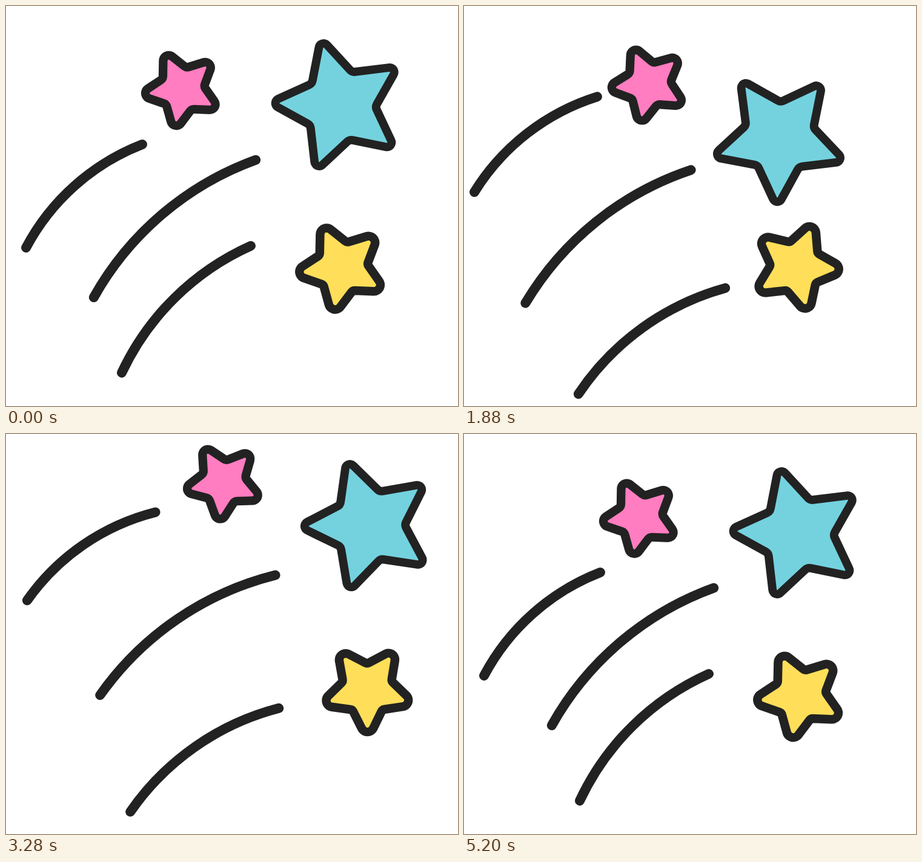
These frames come from a looping animation (746x662 px, 5880 ms). An HTML page:

```html
<!DOCTYPE html>
<html lang="en">
<head>
<meta charset="utf-8">
<title>Shooting stars</title>
<style>
  html, body { margin: 0; width: 100%; height: 100%; overflow: hidden; background: #fff; }
  svg { display: block; width: 746px; height: 662px; }
</style>
</head>
<body>
<svg id="stage" viewBox="0 0 746 662" xmlns="http://www.w3.org/2000/svg"></svg>
<script>
const LOOP = 5880, TICK = 40, STEP = 64, LAST = 81;
const INK = '#222222';
const KEYS = [0, 14, 29, 44, 59, 71];
const stage = document.getElementById('stage');

// Poses are [x, y, degrees] at KEYS. The first one is also the resting pose.
// lag: how strongly a part still moves when it passes a key; end: step at which it rests.
const parts = [
  { len: 257, lag: 0.069, end: 80, poses: [
    [129, 314.5, -41.7], [165, 209, -34.6], [118.5, 229, -37.9],
    [148, 196.5, -33.8], [113.5, 228, -37.9], [115, 281, -40.9]] },
  { len: 351, lag: 0.05, end: 79, poses: [
    [278.5, 368.5, -40.4], [345, 299.5, -33], [238, 381.5, -38.9],
    [322.5, 315.5, -32.9], [237, 381.5, -38.9], [267.5, 373, -40]] },
  { len: 299, lag: 0.35, end: 81, poses: [
    [297.5, 502, -44.6], [329, 516.5, -39.7], [310, 554.5, -35.9],
    [319.5, 546.5, -35.4], [309.5, 555, -35.9], [282, 545.5, -39.7]] },
  { fill: '#ff7dc0', tip: 52, notch: 26, edge: 16.3, soft: 2, lag: 0.1, end: 78, poses: [
    [290.8, 137.8, -43.3], [368.4, 77.8, -32.3], [304.8, 129.5, -41.7],
    [364.1, 77, -38.7], [303.4, 124.6, -75], [287.6, 139.9, -46]] },
  { fill: '#74d2df', tip: 98.8, notch: 50, edge: 14.6, soft: 0.8, lag: 0.033, end: 75.5, poses: [
    [551, 164.6, -33.8], [640.8, 130.5, -26], [520.5, 217.5, -52],
    [635.3, 123.2, -32.9], [524.5, 210.5, -45.7], [545.6, 172, -34.6]] },
  { fill: '#ffde59', tip: 60, notch: 30, edge: 18, soft: 3.5, lag: 0.1, end: 80, poses: [
    [554.6, 432.6, -43.1], [613.8, 421.9, -38.7], [548, 431.6, -68.4],
    [600.8, 422.8, -51.2], [546, 427, -75.3], [534.4, 433.1, -47.9]] }
];

function add(parent, tag, attrs) {
  const el = document.createElementNS('http://www.w3.org/2000/svg', tag);
  for (const name in attrs) el.setAttribute(name, attrs[name]);
  return parent.appendChild(el);
}

function polar(r, deg) {
  const a = deg * Math.PI / 180;
  return [r * Math.cos(a), r * Math.sin(a)];
}

// Five sharp tips with rounded notches between them.
function starPath(tip, notch) {
  let d = '';
  for (let i = 0; i < 5; i++) {
    const a = polar(tip, i * 72), n = polar(notch, i * 72 + 36), b = polar(tip, i * 72 + 72);
    const cut = 9 / Math.hypot(a[0] - n[0], a[1] - n[1]);
    const toward = p => n.map((v, j) => v + (p[j] - v) * cut);
    d += `${i ? 'L' : 'M'}${a} L${toward(a)} Q${n} ${toward(b)} `;
  }
  return d + 'Z';
}

function build(part) {
  const g = part.node = add(stage, 'g', { 'stroke-linejoin': 'round', 'stroke-linecap': 'round' });
  if (part.len) {
    const h = part.len / 2, r = part.len * 1.434;
    add(g, 'path', { d: `M${-h} 0 A${r} ${r} 0 0 1 ${h} 0`, fill: 'none', stroke: INK, 'stroke-width': 16 });
  } else {
    const d = starPath(part.tip, part.notch);
    add(g, 'path', { d, fill: INK, stroke: INK, 'stroke-width': 2 * part.edge });
    add(g, 'path', { d, fill: part.fill, stroke: part.fill, 'stroke-width': 2 * part.soft });
  }
  prepare(part);
}

// Speeds: the part swings forward at keys 1 and 3, back at 2 and 4, then settles at rest.
function prepare(part) {
  const p = part.poses, home = p[0];
  const swing = home.map((_, j) => part.lag * (p[3][j] - (p[2][j] + p[4][j]) / 2));
  const back = swing.map(v => -v), still = [0, 0, 0];
  const settle = home.map((v, j) => 2 * (v - p[5][j]) / (part.end - KEYS[5]));
  part.times = [...KEYS, part.end];
  part.path = [...p, home];
  part.speed = [still, swing, back, swing, back, settle, still];
}

function poseAt(part, k) {
  const { times, path, speed } = part;
  if (k >= part.end) return path[0];
  let i = 0;
  while (k >= times[i + 1]) i++;
  const h = times[i + 1] - times[i], u = (k - times[i]) / h, w = 1 - u;
  return path[i].map((v, j) =>
    v * (1 + 2 * u) * w * w + path[i + 1][j] * u * u * (3 - 2 * u) +
    h * u * w * (speed[i][j] * w - speed[i + 1][j] * u));
}

function draw(ms) {
  const t = Math.floor((ms % LOOP) / TICK) * TICK;
  const k = Math.min(LAST, Math.floor(t / STEP));
  for (const part of parts) {
    const [x, y, deg] = poseAt(part, k);
    part.node.setAttribute('transform', `translate(${x} ${y}) rotate(${deg})`);
  }
}

parts.forEach(build);
draw(0);
const start = performance.now();
function frame() {
  draw(performance.now() - start);
  requestAnimationFrame(frame);
}
requestAnimationFrame(frame);
</script>
</body>
</html>
```
